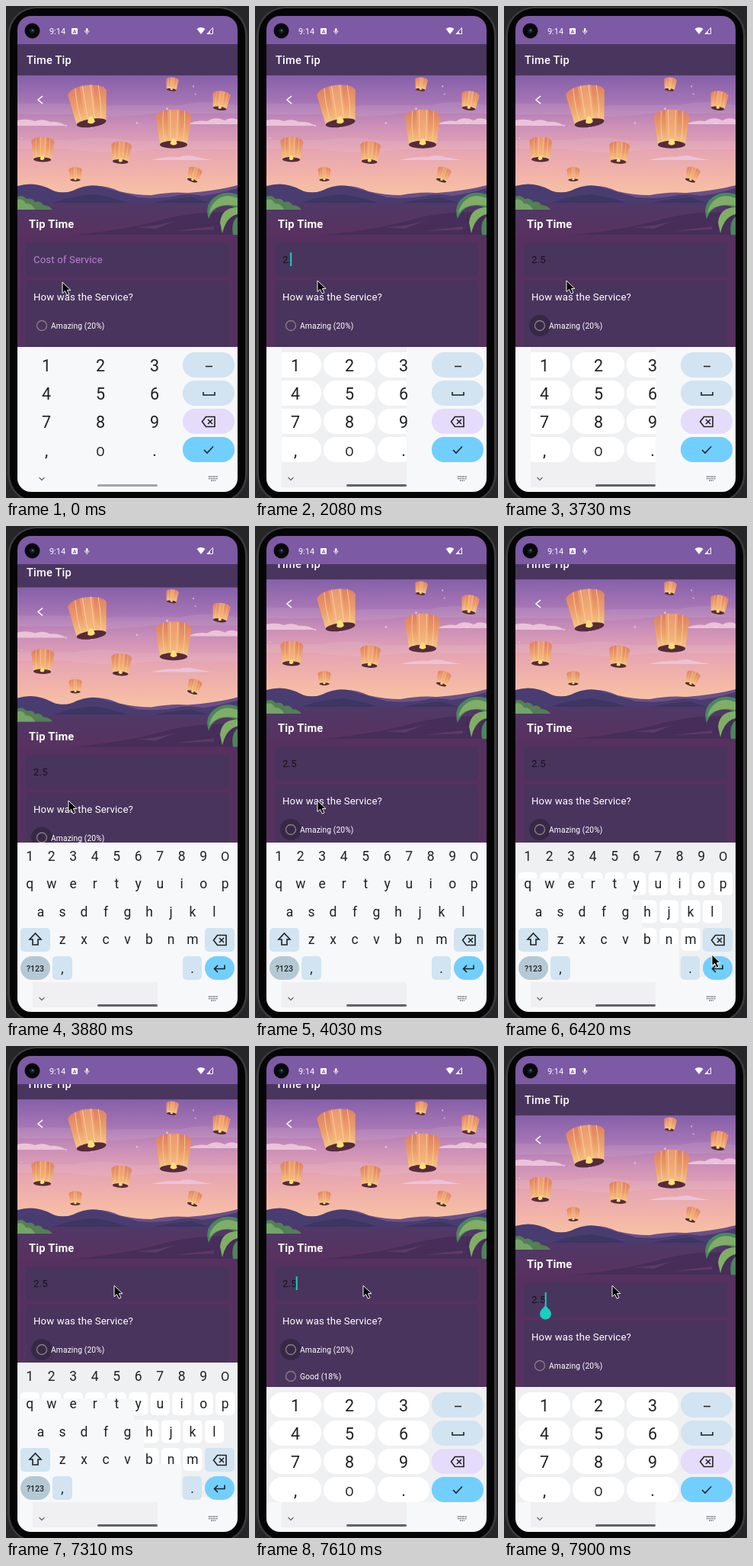
An HTML page that plays this animation: 319 by 645 pixels, repeating every 8000 ms.

```html
<!DOCTYPE html>
<html lang="en">
<head>
<meta charset="utf-8">
<title>Tip calculator</title>
<style>
html, body { margin: 0; width: 100%; height: 100%; overflow: hidden; background: #262628; }
svg { display: block; width: 100vw; height: 100vh; font-family: Roboto, sans-serif; }
.line { fill: none; stroke: #1f2123; stroke-width: 1.6; }
.key { font-size: 17.5px; fill: #1f2123; text-anchor: middle; }
.pad { font-size: 21.5px; }
.round { font-size: 16.5px; }
.white { fill: #fff; }
.body { font-size: 13.2px; letter-spacing: .01em; }
.title { font-size: 14.66px; letter-spacing: .0125em; }
.option { font-size: 10.3px; letter-spacing: .01em; }
</style>
</head>
<body>
<svg viewBox="0 0 319 645">
  <defs>
    <linearGradient id="sky" x1="0" y1="0" x2="0" y2="1">
      <stop offset="0" stop-color="#8560a9"/>
      <stop offset=".2" stop-color="#a474b4"/>
      <stop offset=".4" stop-color="#cd91b8"/>
      <stop offset=".6" stop-color="#e7a6b1"/>
      <stop offset=".8" stop-color="#f3b6a8"/>
      <stop offset="1" stop-color="#fac7a1"/>
    </linearGradient>
    <linearGradient id="glow" x1="0" y1="0" x2="0" y2="1">
      <stop offset="0" stop-color="#de7d60"/>
      <stop offset=".5" stop-color="#ec9e6c"/>
      <stop offset="1" stop-color="#f7cd86"/>
    </linearGradient>
    <linearGradient id="ground" x1="0" y1="0" x2="0" y2="1">
      <stop offset="0" stop-color="#503867"/>
      <stop offset="1" stop-color="#58325f"/>
    </linearGradient>
    <clipPath id="screen"><rect x="15" y="13" width="289" height="624" rx="18"/></clipPath>
    <clipPath id="padClip"><rect id="padArea" y="447"/></clipPath>
    <clipPath id="restClip"><path d="M15 415H304V591H230V548H181V490H168V462H15z"/></clipPath>
    <g id="lantern">
      <path fill="url(#glow)" d="M-26-18Q-23-27 0-28Q23-27 26-18L20 22Q0 29-20 22z"/>
      <path fill="#f5b981" opacity=".45" d="M-9-27Q0-29 9-27L7 24H-7z"/>
      <path fill="none" stroke="#fbd79b" stroke-width=".8" d="M-15-26Q-17 0-12 23M-5-28L-4 25M6-28L5 25M16-26Q17 0 13 23"/>
      <ellipse cy="23" rx="20" ry="5.5" fill="#552b3b"/>
      <path fill="#ffdf78" d="M-5 22Q-3 13 0 14Q4 14 5 22Q0 26-5 22z"/>
    </g>
  </defs>

  <rect width="319" height="645" fill="#262628"/>
  <rect x="2" y="1" width="315" height="650" rx="38" fill="#3c3c3e"/>
  <rect x="5" y="3" width="309" height="646" rx="35" fill="#050506"/>

  <g clip-path="url(#screen)">
    <g id="page">
      <rect x="15" y="50" width="289" height="600" fill="#56315f"/>
      <rect x="15" y="50" width="289" height="41" fill="#4a355f"/>
      <text class="white title" x="27" y="76" font-weight="500">Time Tip</text>

      <rect x="15" y="91" width="289" height="168" fill="url(#sky)"/>
      <g fill="#fff" opacity=".08">
        <path d="M15 128H80Q110 134 145 130H230Q260 122 304 130V141H190Q140 148 90 142H15z"/>
        <path d="M15 176H90Q125 168 165 177H304V188H190Q130 196 80 187H15z"/>
      </g>
      <g fill="#eac3d9">
        <path d="M15 157V150Q28 147 38 151Q49 147 58 152Q70 151 79 157z"/>
        <path d="M238 155Q252 149 264 151Q275 144 287 150Q295 145 304 149V155z"/>
        <path d="M190 202Q211 197 227 198Q239 194 249 198L270 202z"/>
      </g>
      <g id="stars" fill="#eed2ee" opacity=".7"></g>
      <path fill="#6b5087" d="M15 240Q38 231 60 243Q82 247 101 239Q123 231 149 243Q170 248 191 248Q216 243 239 245Q278 242 304 235V260H15z"/>
      <path fill="#493c70" d="M15 236Q38 229 60 241Q74 248 88 242Q106 233 122 236Q147 243 174 251Q201 253 222 249Q239 245 258 249Q280 246 304 239V260H15z"/>
      <path fill="#3d3562" d="M62 258Q84 249 116 247Q141 251 161 258zM194 258Q216 253 244 251L267 258z"/>
      <rect x="15" y="258" width="289" height="42" fill="url(#ground)"/>
      <path fill="#472d59" d="M90 300Q151 294 195 283Q247 267 304 271V300z"/>
      <path fill="#5d3a68" d="M171 290Q204 288 224 281L197 292zM222 295L273 289V293z"/>
      <path fill="#547e55" d="M15 250Q22 247 27 253Q35 251 38 257Q46 255 49 261Q57 261 61 267H15z"/>
      <path fill="#74a466" d="M15 254Q22 251 26 259Q34 258 38 267H15z"/>
      <g id="lanterns"></g>
      <path fill="#4c8560" d="M304 247Q284 240 270 254Q261 264 266 279Q271 266 281 263Q293 259 304 266zM304 276Q295 283 298 300H304z"/>
      <path fill="#80ae66" d="M304 252Q285 244 273 258Q268 264 267 272Q278 257 304 262zM304 264Q283 264 281 284L284 298Q289 276 304 273z"/>
      <path class="line" style="stroke:#fff" d="M48 118L42 123L48 128"/>
      <text class="white title" x="30" y="291" font-weight="700">Tip Time</text>

      <rect x="26" y="310" width="267" height="45" rx="3" fill="#49345d"/>
      <rect x="26" y="360" width="267" height="150" rx="3" fill="#49345d"/>
      <text id="field" class="body" x="36" y="337"></text>
      <rect id="caret" y="323" width="2" height="18" fill="#17d0c0"/>
      <path id="handle" fill="#17d0c0" d="M54.5 340L60 346A7.5 7.5 0 1 1 49 346z"/>
      <text class="white body" x="36" y="386">How was the Service?</text>
      <circle id="ripple" cx="47" cy="419" r="14" fill="#372946"/>
      <g id="options"></g>
    </g>

    <rect x="15" y="13" width="289" height="37" fill="#7c5aa4"/>
    <circle cx="34.5" cy="32.5" r="10" fill="#08080a"/>
    <circle cx="34.5" cy="32.5" r="3.2" fill="#152129"/>
    <circle cx="35" cy="32" r="1.2" fill="#4d686c"/>
    <text class="white" x="57" y="37" font-size="10.9">9:14</text>
    <rect class="white" x="86" y="29" width="8" height="8" rx="1.3"/>
    <text x="90" y="35.6" font-size="7" font-weight="700" text-anchor="middle" fill="#7c5aa4">A</text>
    <rect class="white" x="105" y="29" width="2.4" height="5" rx="1.2"/>
    <path fill="none" stroke="#fff" stroke-width=".8" d="M103.4 32Q103.4 35.2 106.2 35.2Q109 35.2 109 32M106.2 35V37.5"/>
    <path class="white" d="M250.5 30Q256 26 261.5 30L256 37z"/>
    <path fill="none" stroke="#fff" d="M264 36.5H271.5V28.5z"/>
    <path class="white" d="M264 37L268 33V37z"/>

    <g id="pad">
      <rect x="15" y="447" width="289" height="191" fill="#f7f8fa"/>
      <g clip-path="url(#padClip)">
        <rect x="15" y="447" width="289" height="185" fill="#eff0f2"/>
        <g id="padKeys"></g>
      </g>
      <g id="padLabels"></g>
      <path class="line" d="M262 472.5H271M259 506V510H274V506M260 582L264 586L272 577.5"/>
      <use href="#erase" x="-15" y="2"/>
    </g>

    <g id="letters">
      <rect x="15" y="415" width="289" height="223" fill="#f7f8fa"/>
      <rect id="topReveal" x="15" y="415" width="289" height="47" fill="#eff0f2"/>
      <g id="restReveal" clip-path="url(#restClip)">
        <rect x="15" y="415" width="289" height="183" fill="#eff0f2"/>
        <g id="letterKeys"></g>
      </g>
      <g id="letterLabels"></g>
      <path class="line" d="M38.5 534L46 542H42V549H35V542H31z"/>
      <path id="erase" class="line" d="M272.5 543L277.5 536.5H289V549.5H277.5zM280 540L286 546M286 540L280 546"/>
      <path class="line" d="M287 575.5V580.5H274M278 576L273.5 580.5L278 585"/>
    </g>

    <rect id="navBox" x="35" y="598" width="164" height="33" fill="#f0f0f2"/>
    <path class="line" style="stroke:#696b70;stroke-width:1.3" d="M43.5 618L47 621.5L50.5 618"/>
    <path class="line" style="stroke:#55575c;stroke-width:1.3;stroke-dasharray:1.5 1" d="M266 617H278M266 619.6H278M269 622.2H275"/>
    <rect id="bar" x="120" y="627" width="79" height="3" rx="1.5"/>
  </g>

  <path id="mouse" fill="#000" stroke="#fff" stroke-width="1.1" stroke-linejoin="round"
    d="M0 0V16.5L4 13L7 19.5L10.2 18L7.3 12H12.5z"/>
</svg>

<script>
const $ = id => document.getElementById(id);
const key = (x, y, w, h, r, fill = '#fff') =>
  `<rect x="${x}" y="${y}" width="${w}" height="${h}" rx="${r}" fill="${fill}"/>`;
// The keyboard face draws zero as a round letter shape.
const label = (x, y, s, cls = '') => s == '0'
  ? `<text class="key round" x="${x}" y="${y}">O</text>`
  : `<text class="key ${cls}" x="${x}" y="${y}">${s}</text>`;

// x, y, scale, tilt
$('lanterns').innerHTML = [
  [109, 131, .98, -8], [220, 161, .9, 0], [48, 188, .58, 2], [151, 192, .52, 4],
  [91, 220.5, .33, 0], [247, 221, .35, 18], [218, 102.5, .32, 6], [282, 124, .45, 8]
].map(([x, y, s, a]) =>
  `<use href="#lantern" transform="translate(${x} ${y}) rotate(${a}) scale(${s})"/>`).join('');

let seed = 7;
const random = () => (seed = seed * 16807 % 2147483647) / 2147483647;
for (let i = 0; i < 9; i++)
  $('stars').innerHTML += `<circle cx="${20 + 280 * random()}" cy="${95 + 85 * random()}" r="${.6 + random()}"/>`;

['Amazing (20%)', 'Good (18%)'].forEach((s, i) => {
  const y = 419 + 35 * i;
  $('options').innerHTML += `<circle cx="47" cy="${y}" r="6.5" fill="none" stroke="#8c7a83" stroke-width="1.4"/>
    <text class="white option" x="59" y="${y + 4}">${s}</text>`;
});

const [blue, lilac, cyan, slate] = ['#d2e4f1', '#e5dcfb', '#72cffd', '#b4c9d5'];
['123', '456', '789', ',0.'].forEach((row, r) => {
  const y = 454 + 37 * r;
  [...row].forEach((c, i) => {
    $('padKeys').innerHTML += key(19 + 71 * i, y, 68, 33, 16);
    $('padLabels').innerHTML += label(53 + 71 * i, y + 25, c, 'pad');
  });
  $('padLabels').innerHTML += key(232, y, 68, 33, 16, [blue, blue, lilac, cyan][r]);
});

['1234567890', 'qwertyuiop', 'asdfghjkl', 'zxcvbnm'].forEach((row, r) => [...row].forEach((c, i) => {
  const x = 159.5 + 28.5 * (i - (row.length - 1) / 2), y = 438.5 + 36.5 * r;
  if (r) $('letterKeys').innerHTML += key(x - 12.5, y - 21, 25, 30, 5);
  $('letterLabels').innerHTML += label(x, y, c);
}));
$('letterLabels').innerHTML += key(19, 527, 39, 31, 5, blue) + key(261, 527, 39, 31, 5, blue)
  + key(19, 564, 39, 31, 15.5, slate) + key(261, 564, 39, 31, 15.5, cyan)
  + key(61, 564, 26, 31, 5, blue) + key(232, 564, 25, 31, 5, blue)
  + label(74, 586, ',') + label(244.5, 586, '.')
  + '<text x="38.5" y="583.5" font-size="10.5" font-weight="500" text-anchor="middle" fill="#1f2123">?123</text>';

// All times below count screen updates.
const update = 149.2;
const typing = [11, 14, 18], focusing = [3, 51];
// first update, last update, x, y
const moves = [
  [0, 1, 180, 527], [1, 6, 82, 360], [27, 30, 236, 436], [30, 32, 170, 338],
  [37, 41, 301, 570], [41, 43, 273, 562], [43, 44, 172, 467], [44, 49, 142, 314]
];
const ramp = (n, a, b) => Math.min(1, Math.max(0, (n - a) / (b - a)));

function mouseAt(n) {
  let x = 74, y = 362;
  for (const [a, b, toX, toY] of moves) {
    const k = ramp(n, a, b);
    x += (toX - x) * k;
    y += (toY - y) * k;
  }
  return [x, y];
}

const set = (id, attrs) => { for (const a in attrs) $(id).setAttribute(a, attrs[a]); };
const show = (id, on) => { $(id).style.display = on ? '' : 'none'; };

function draw(t) {
  const n = Math.floor((t + 12) / update);
  const text = '2.5'.slice(0, typing.filter(k => k <= n).length);
  const woken = Math.max(...[...typing, ...focusing].filter(k => k <= n));
  const focused = n >= 3 && n < 24 || n >= 51;
  const full = n >= 51, alpha = n >= 26 && !full;

  set('mouse', { transform: `translate(${mouseAt(n)}) scale(.88)` });
  set('page', { transform: `translate(0 ${-21 * (ramp(n, 25, 27) - ramp(n, 51, 53))})` });
  $('field').textContent = text || 'Cost of Service';
  set('field', { fill: text ? '#17111d' : '#bc82d4' });
  set('caret', { x: text ? 35 + $('field').getComputedTextLength() : 35 });
  show('caret', focused && Math.floor((n - woken) / 3) % 2 == 0);
  show('handle', n >= 53);
  show('ripple', n >= 24 && n < 53);
  show('pad', !alpha);
  show('letters', alpha);
  show('topReveal', n >= 30);
  show('restReveal', n >= 38);
  show('navBox', n >= 3);
  set('bar', { fill: n < 3 ? '#a3a4a7' : '#626367' });
  set('padArea', full ? { x: 15, width: 289, height: 151 }
    : { x: 35, width: n < 3 ? 0 : 164, height: 184 });
}

const start = performance.now();
(function tick() {
  draw((performance.now() - start) % 8000);
  requestAnimationFrame(tick);
})();
</script>
</body>
</html>
```
